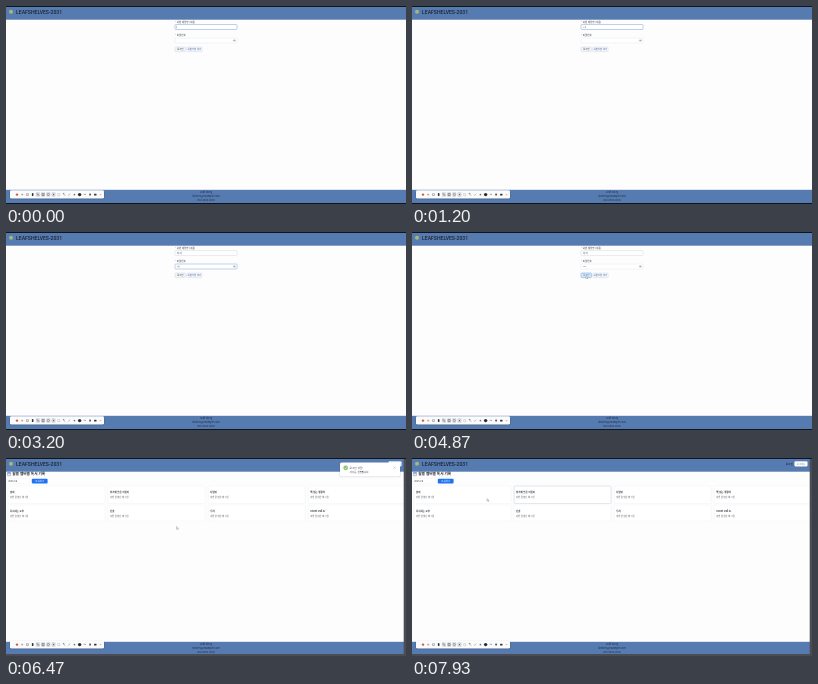
Recreate the animation shown at these times as an HTML page. Size 400 by 198 pixels, loop 8000 ms.

```html
<!DOCTYPE html>
<html lang="ko">
<head>
<meta charset="utf-8">
<title>LEAFSHELVES-2031</title>
<style>
html, body { margin: 0; width: 100%; height: 100%; overflow: hidden; background: #fdfdfe; }
svg { display: block; width: 100%; height: 100%; }
text { font-family: "Noto Sans CJK KR", "Noto Sans CJK", "Noto Sans", sans-serif; white-space: pre; }
.brand { font-family: Roboto, sans-serif; font-weight: 500; }
.b { font-weight: 700; }
</style>
</head>
<body>
<svg id="stage" viewBox="0 0 400 198" preserveAspectRatio="none"></svg>
<script>
const LOOP = 8000, BLUE = '#567bb0', INK = '#30343c';

const rect = (x, y, w, h, fill, more = '') =>
  `<rect x="${x}" y="${y}" width="${w}" height="${h}" fill="${fill}" ${more}/>`;
const box = (x, y, w, h, stroke, r = 0.8, fill = '#fff', id = '') =>
  rect(x, y, w, h, fill, `rx="${r}" stroke="${stroke}" stroke-width=".5" ${id && `id="${id}"`}`);
const label = (x, y, size, str, more = '', fill = INK) =>
  `<text x="${x}" y="${y}" font-size="${size}" fill="${fill}" ${more}>${str}</text>`;
const dot = (x, y, r, fill) => `<circle cx="${x}" cy="${y}" r="${r}" fill="${fill}"/>`;
const line = (d, stroke = '#777', w = 0.5) =>
  `<path d="${d}" fill="none" stroke="${stroke}" stroke-width="${w}"/>`;
const group = (id, body) => `<g id="${id}">${body}</g>`;
const MID = 'text-anchor="middle"';

const frame = rect(0, 0, 400, 13.7, BLUE) + rect(0, 183.8, 400, 14.2, BLUE)
  + rect(0, 0, 400, 1, '#10141c') + rect(0, 197, 400, 1, '#10141c')
  + dot(5, 5.8, 2, '#a9b777')
  + label(10, 7.9, 5.1, 'LEAFSHELVES-2031', 'class="brand"', '#1c2533')
  + label(200, 187, 2.6, 'Leaf Story', MID, '#1c2740')
  + label(200, 191, 2.6, 'shelves@example.com', MID, '#1c2740')
  + label(200, 195, 2.6, '000-0000-0000', MID, '#1c2740');

// Dark window edge that appears once the list has loaded
const edge = rect(397.7, 1, 2.3, 197, '#4b4d52') + rect(0, 196, 400, 2, '#4b4d52');

const login = label(169, 16.8, 2.4, '<tspan fill="#e55">*</tspan> 회원 계정명 (이름)')
  + box(169, 18.5, 62, 5, '#ccd', 0.8, '#fff', 'nameBox')
  + label(170.8, 22, 2.6, '', 'id="name"')
  + label(169, 30.1, 2.4, '<tspan fill="#e55">*</tspan> 비밀번호')
  + box(169, 32, 62, 5, '#ccd', 0.8, '#fff', 'passBox')
  + label(170.8, 35.4, 2.6, '', 'id="pass"')
  + line('M226.9 34.5q1.4 -1.6 2.8 0q-1.4 1.6 -2.8 0', '#888', 0.4) + dot(228.3, 34.5, 0.45, '#777')
  + rect(170.4, 19.8, 0.4, 2.5, '#444', 'id="caret"')
  + box(169, 41, 10.4, 4.7, '#cfd4e0', 0.8, '#f3f5fa', 'enter')
  + label(174.2, 44.3, 2.4, '로그인', MID + ' id="enterText"')
  + box(180.6, 41, 15.6, 4.7, '#d3d8e4', 0.8, '#f6f8fc')
  + label(188.4, 44.3, 2.4, '회원가입 하기', MID, '#3c5c9c');

const members = ['솔비', '창가에 앉은 어린이', '다람쥐', '책 읽는 생활자',
  '독서하는 오후', '은솔', '두리', 'Violet leaf AI'];
const card = (name, i) => {
  const x = 2 + (i % 4) * 100.1, y = i < 4 ? 28 : 47;
  return box(x, y, 97, i < 4 ? 17.5 : 16, '#eff0f3', 1)
    + label(x + 2, y + 6.5, 2.4, name, 'class="b"')
    + label(x + 2, y + 12.4, 2.2, '이번 달 읽은 책: 0권', '', '#454952');
};

const board = label(373.8, 6.9, 2.5, '로그인', 'class="b"', '#1d2c48')
  + box(382.7, 3.5, 12.6, 4.8, '#e4e8f0', 0.8)
  + label(389, 6.8, 2.3, '로그아웃', MID, '#777')
  + box(1.4, 14.4, 3.2, 3.4, '#7c93b8', 0.4, '#dfe8f4') + rect(1.4, 14.4, 3.2, 1.1, '#6489c0')
  + label(6.3, 17.4, 3.6, '월별 멤버별 독서 기록', 'class="b"', '#20242c')
  + box(1, 20.6, 22.5, 4.8, '#f1f2f5', 0.8)
  + label(2.2, 24, 2.4, '2025-08')
  + rect(25.8, 20.8, 15.8, 4.8, '#1f72f2', 'rx="1"')
  + label(33.7, 24.1, 2.5, '조회하기', MID, '#fff')
  + group('wait', line('M44 21.8h1.8M44 24.4h1.8', '#aab', 0.4))
  + group('cards', members.map(card).join('')
    + `<rect id="hover" x="102.1" y="28" width="97" height="17.5" rx="1" fill="none" stroke="#cbd4e3" stroke-width=".7"/>`);

const toast = rect(333.5, 4.8, 61, 14.4, '#26344c', 'rx="1.5" opacity=".16"')
  + rect(334, 4.4, 60, 14.2, '#fff', 'rx="1.5"')
  + dot(339.7, 9.8, 2.4, '#8cc46c') + line('M338.6 9.8l.9 1l1.6 -2', '#fff', 0.5)
  + label(343.5, 10.6, 2.6, '로그인 성공!')
  + label(343.5, 15.1, 2.4, '사서님, 환영합니다.')
  + line('M387.8 8.8l1.6 1.6m0 -1.6l-1.6 1.6', '#999', 0.4);

const key = x => rect(x - 2, 186.3, 4, 4.4, '#d3d7dd', 'rx=".6"');
const glyphs = [
  x => dot(x, 188.6, 1.2, '#d8543f'),
  x => line(`M${x - 1} 188.6h2M${x} 187.6v2`),
  x => line(`M${x - 1} 187.7h2v1.8h-2z`),
  x => rect(x - 0.8, 187.1, 1.6, 3, '#333', 'rx=".7"'),
  x => key(x) + line(`M${x - 1} 187.4l2 2.2`, '#333', 0.6),
  x => key(x) + line(`M${x - 1} 187.6h2v2h-2z`, '#555'),
  x => key(x) + `<circle cx="${x}" cy="188.5" r="1.1" fill="none" stroke="#777" stroke-width=".5"/>`,
  x => key(x) + dot(x, 188.6, 0.6, '#555'),
  x => line(`M${x - 1.1} 187.5h2.2v2.2h-2.2z`, '#aaa', 0.4),
  x => line(`M${x - 1} 187.4l2 2.2m-2 -2.2h1.4`, '#444'),
  x => line(`M${x - 0.9} 189.6l1.8 -2`, '#666'),
  x => dot(x, 188.6, 0.9, '#777'),
  x => dot(x, 188.6, 1.7, '#272d38'),
  x => line(`M${x - 1} 189l1 -1.2l1 1.2`, '#555'),
  x => rect(x - 0.8, 187.6, 1.6, 2, '#444', 'rx=".5"'),
  x => rect(x - 1.2, 187.7, 2.4, 1.9, '#333', 'rx=".4"'),
  x => line(`M${x - 0.8} 188.6h1.6`, '#777')
];
const tools = rect(3.6, 184.7, 94.8, 8.6, '#16243c', 'rx="1.6" opacity=".3"')
  + rect(4, 184.2, 94, 8.4, '#fbfbfc', 'rx="1.4"')
  + glyphs.map((g, i) => g(11 + i * 5.22)).join('');

document.getElementById('stage').innerHTML = frame + group('login', login)
  + group('board', board) + group('toast', toast) + group('edge', edge) + group('tools', tools)
  + group('mouse', `<path d="M0 0v2.7l.7 -.6l.5 1l.5 -.3l-.5 -.9h.9z" fill="#fff" stroke="#777" stroke-width=".35"/>`);

const el = id => document.getElementById(id);
const set = (id, attrs) => { for (const k in attrs) el(id).setAttribute(k, attrs[k]); };
const show = (id, on) => set(id, { visibility: on ? 'visible' : 'hidden' });

const names = [[0, ''], [1000, 'ㅅ'], [1670, '사'], [1930, '삿'], [2200, '사서']];
const dots = [[0, 0], [2670, 1], [3000, 2], [3400, 3], [3600, 4]];
const path = [[4130, 196, 34], [4600, 174, 43], [5530, 173.5, 47.5], [5870, 173.5, 47.5],
  [6400, 170.5, 68.5], [7400, 170.5, 68.5], [7660, 138, 44], [7930, 75, 40.5], [8000, 66, 36]];
const fade = [[0, 0], [7600, 0], [7700, 1], [7850, 1], [8000, 0.4]];

const at = (table, t) => table.filter(s => s[0] <= t).pop()[1];
function tween(table, t, col = 1) {
  if (t <= table[0][0]) return table[0][col];
  const i = table.findIndex(s => s[0] > t);
  if (i < 0) return table[table.length - 1][col];
  const a = table[i - 1], b = table[i], p = (t - a[0]) / (b[0] - a[0]);
  return a[col] + (b[col] - a[col]) * p * p * (3 - 2 * p);
}
const clamp = v => Math.max(0, Math.min(1, v));

function draw(t) {
  const inside = t >= 5460, onPass = t >= 2470, over = t >= 4530;
  const loaded = t >= 5870;
  show('login', !inside);
  show('board', inside);
  show('edge', loaded);
  set('cards', { display: loaded ? 'inline' : 'none' });
  set('wait', { display: loaded ? 'none' : 'inline' });

  const name = at(names, t), count = at(dots, t);
  el('name').textContent = name;
  el('pass').textContent = '•'.repeat(count);
  set('nameBox', { stroke: onPass ? '#d5d9e2' : '#7f9ed0' });
  set('passBox', { stroke: onPass && !over ? '#7fa5d8' : '#e2e4ea' });
  set('caret', {
    x: 170.6 + (onPass ? count * 1.1 : name.length * 2.4), y: onPass ? 33.3 : 19.8,
    opacity: !over && t % 1060 < 530 ? 0.7 : 0
  });
  set('enter', { stroke: over ? '#6f9bd8' : '#cfd4e0', fill: over ? '#dcebf4' : '#f3f5fa' });
  set('enterText', { fill: over ? '#2a69c4' : INK });

  const left = 1 - clamp((t - 5460) / 300), gone = clamp((t - 7470) / 190);
  show('toast', inside && gone < 1);
  set('toast', { transform: `translate(${60 * left ** 3} 0)`, opacity: (1 - left ** 3) * (1 - gone) });

  set('tools', { transform: `translate(0 ${loaded ? -2 : 0})` });
  set('hover', { opacity: tween(fade, t) });
  show('mouse', t >= 4130);
  set('mouse', { transform: `translate(${tween(path, t)} ${tween(path, t, 2)})` });
}

function tick() {
  draw(performance.now() % LOOP);
  requestAnimationFrame(tick);
}
tick();
</script>
</body>
</html>
```
